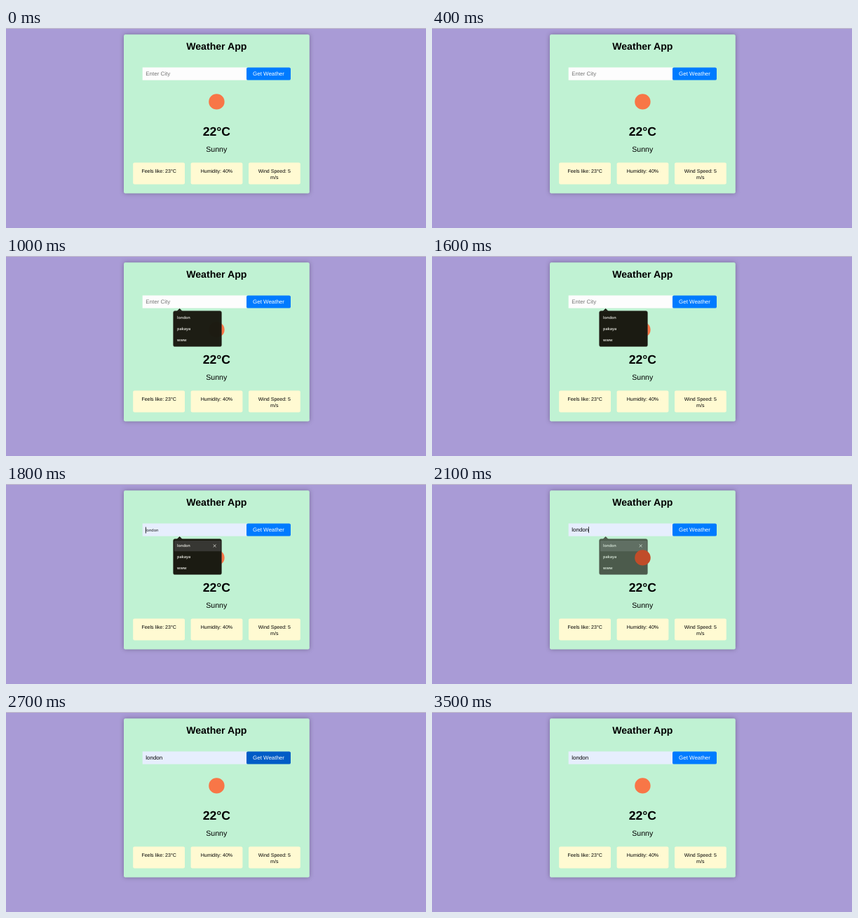
Write an HTML page that moves like this. It is 599 px wide and 286 px high and loops after 3.8 s.

```html
<!DOCTYPE html>
<html lang="en">
<head>
<meta charset="utf-8">
<title>Weather App</title>
<style>
  html, body { margin: 0; width: 100%; height: 100%; overflow: hidden; background: #a99bd6; }
  svg { display: block; width: 599px; height: 286px; }
  text { font-family: "Liberation Sans", Arial, sans-serif; text-rendering: geometricPrecision; }
  .mid { text-anchor: middle; }
  .bold { font-weight: 700; }
  .field { font-size: 7.95px; }
  .small { font-size: 7.06px; }
  .menu text, .preview text { font: 600 5.5px "Open Sans", sans-serif; }
  .preview text { font-weight: 500; }
  .panel { filter: drop-shadow(0 0 3px rgba(0, 0, 0, .3)); }
  .menu, .row, .glow, .preview, .value, .caret, .hint, .input, .button {
    animation: 3.8s step-end infinite;
  }

  .hint { animation-name: hint; }
  .input { animation-name: input; }
  .menu { animation-name: menu; }
  .row { animation-name: row; }
  .glow { animation-name: glow; }
  .preview { animation-name: preview; }
  .value { animation-name: value; }
  .caret { animation-name: caret; }
  .button { animation-name: button; }

  @keyframes hint { 0% { opacity: 1 } 47.36%, 100% { opacity: 0 } }
  @keyframes input { 0% { fill: #fdfdfd } 47.36%, 100% { fill: #e6eefd } }
  @keyframes menu {
    0% { opacity: 0 }
    26.31% { opacity: .99 }
    42.1% { opacity: 1 }
    55.26% { opacity: .7 }
    57.89% { opacity: .3 }
    60.52%, 100% { opacity: 0 }
  }
  @keyframes row { 0% { opacity: 0 } 47.36%, 100% { opacity: 1 } }
  @keyframes glow { 0% { opacity: 0 } 55.26%, 100% { opacity: 1 } }
  @keyframes preview { 0% { opacity: 0 } 47.36% { opacity: 1 } 52.63%, 100% { opacity: 0 } }
  @keyframes value { 0% { opacity: 0 } 52.63%, 100% { opacity: 1 } }
  @keyframes caret { 0% { opacity: 0 } 52.63% { opacity: 1 } 71.05%, 100% { opacity: 0 } }
  @keyframes button {
    0% { fill: #007bff }
    71.05% { fill: #005cc6 }
    73.68% { fill: #0058bc }
    76.31% { fill: #0056b3 }
    89.47% { fill: #006ddf }
    92.1%, 100% { fill: #007bff }
  }
</style>
</head>
<body>
<svg viewBox="0 0 599 286">
  <rect width="599" height="286" fill="#a99bd6"/>
  <rect width="599" height="1" fill="#c3bfca"/>
  <rect class="panel" x="168" y="9.3" width="264.8" height="227.2" rx="2.2" fill="#c0f2d3"/>
  <text class="mid bold" x="300.3" y="31" font-size="14.1">Weather App</text>

  <!-- Search form -->
  <rect class="input" x="194.7" y="56.4" width="148.6" height="18.2"/>
  <text class="field hint" x="199.3" y="68.2" fill="#757575">Enter City</text>
  <g class="preview">
    <text x="199.2" y="67.8">london</text>
    <rect x="198.9" y="61.5" width=".8" height="9"/>
  </g>
  <text class="field value" x="199.3" y="68.2">london</text>
  <rect class="caret" x="223.2" y="61" width=".7" height="9"/>
  <rect class="button" x="343" y="56.4" width="63" height="18.2" rx="2.2"/>
  <text class="mid field" x="374.5" y="68.2" fill="#fff">Get Weather</text>

  <!-- Current weather -->
  <circle cx="300.4" cy="105.4" r="11.2" fill="#f87647"/>
  <text class="mid bold" x="300.3" y="154" font-size="17.6">22°C</text>
  <text class="mid" x="300.3" y="176.6" font-size="10.6">Sunny</text>

  <!-- Details -->
  <g fill="#fffad2">
    <rect x="181.2" y="192.4" width="73.8" height="31" rx="2.2"/>
    <rect x="263.6" y="192.4" width="73.8" height="31" rx="2.2"/>
    <rect x="346" y="192.4" width="73.8" height="31" rx="2.2"/>
  </g>
  <g class="mid small">
    <text x="218.1" y="207.4">Feels like: 23°C</text>
    <text x="300.4" y="207.4">Humidity: 40%</text>
    <text x="382.8" y="207.4">Wind Speed: 5</text>
    <text x="382.8" y="215.5">m/s</text>
  </g>

  <!-- Suggestions -->
  <g class="menu">
    <path d="M243.2 79.2 247.6 74.9 252 79.2Z" fill="#1b1b12"/>
    <rect x="238.5" y="78.6" width="69" height="51" rx="2.6" fill="#1b1b12" stroke="#4b5148" stroke-width=".4"/>
    <g class="row">
      <rect x="240" y="81" width="66.5" height="15.2" rx="1" fill="#373733"/>
      <path d="M295.7 86.5l3.8 3.8m0-3.8l-3.8 3.8" stroke="#e6e6e0" stroke-width=".8"/>
    </g>
    <circle class="glow" cx="300.4" cy="105.4" r="11.2" fill="#a83c1e"/>
    <g fill="#efefe8">
      <text x="244" y="90.4">london</text>
      <text x="244" y="106.2">pakaya</text>
      <text x="244" y="122">www</text>
    </g>
  </g>
</svg>
</body>
</html>
```
